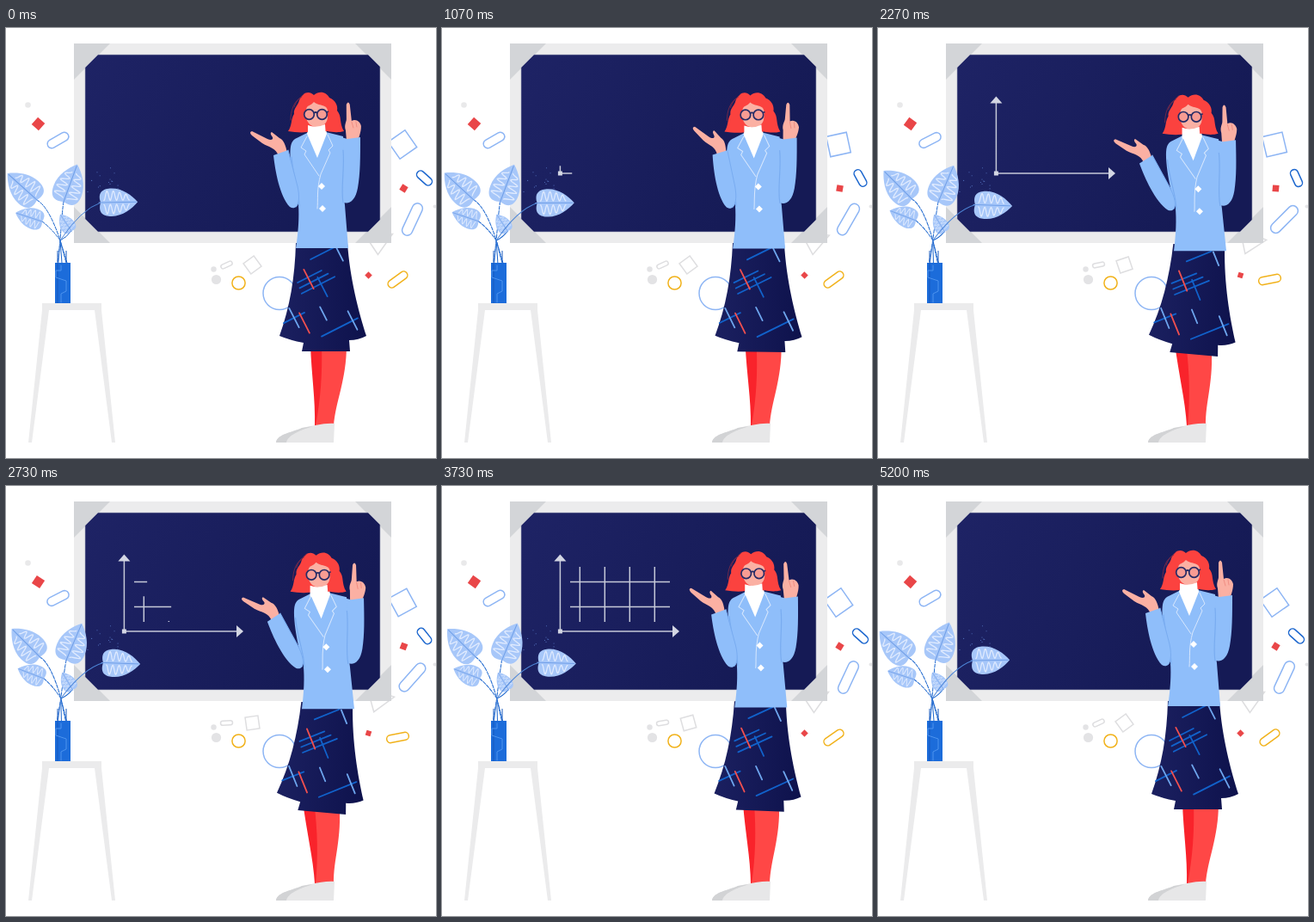
An HTML page for the animation above (5260 ms loop, 500x500 px).

```html
<!DOCTYPE html>
<html lang="en">
<head>
<meta charset="utf-8">
<title>Teacher at the board</title>
<style>
html, body { margin: 0; width: 100%; height: 100%; overflow: hidden; background: #fff; }
svg { display: block; width: 100%; height: 100%; }
.line { fill: none; stroke-linecap: round; }
.chalk { fill: none; stroke: #c6c9d8; stroke-width: 1.5; }
</style>
</head>
<body>
<svg viewBox="0 0 500 500">
  <defs>
    <linearGradient id="slate" x2="1" y2=".3">
      <stop stop-color="#1e2365"/><stop offset="1" stop-color="#151a55"/>
    </linearGradient>
    <linearGradient id="cloth">
      <stop stop-color="#1b2060"/><stop offset="1" stop-color="#0e124c"/>
    </linearGradient>
  </defs>

  <g id="props" class="line" stroke-width="1.5" transform="translate(.5 .5)"></g>

  <path d="M79 18H448V250H79Z" fill="#ececed"/>
  <path d="M79 18H121L79 60ZM448 18H406L448 60ZM79 250H121L79 208ZM448 250H406L448 208Z" fill="#d3d5d8"/>
  <path d="M107 31H421L435 45V223L421 237H107L92 222V46Z" fill="url(#slate)" stroke="#a9acc0" stroke-width=".6"/>
  <g id="chart"></g>

  <path d="M42 320H111V328H103L123 482H127L111 328H42L26 482H30L50 328H42Z" fill="#ebebec"/>

  <g id="specks" fill="#5877c4"></g>
  <g id="plant"></g>
  <path d="M57 273H75V320H57Z" fill="#1c6cda"/>
  <path d="M60 259V320M70 259V273" stroke="#1659bd" fill="none"/>
  <path class="line" d="M64 276V282H58V290L70 294V306L64 309V319" stroke="#4d93ee"/>

  <g id="legs">
    <path d="M354 368H372L366 463H359C360 432 355 402 354 368Z" fill="#f9232b"/>
    <path d="M367 368H396C396 410 383 434 381 463H360C366 430 368 402 367 368Z" fill="#ff4746"/>
  </g>
  <path d="M314 482C315 472 334 470 344 465C356 463 370 459 382 460L381 482Z" fill="#e7e7e8"/>
  <path d="M314 482C315 472 334 470 344 465L357 463C342 468 328 473 326 482Z" fill="#d2d3d5"/>

  <g id="skirt">
    <path d="M337 250H397C400 292 410 330 419 358Q410 363 399 363L400 376H344L346 366Q330 363 318 358C330 325 336 290 337 250Z" fill="url(#cloth)"/>
    <g id="plaid" class="line" stroke-width="1.8"></g>
  </g>

  <g id="torso">
    <g id="rightHand">
      <path d="M396 131L395 119C393 113 396 109 396 106L396 89Q398 84 400 89L402 108C407 105 412 109 413 114C413 122 410 126 410 131Z" fill="#fbb0a3"/>
      <path class="line" d="M402 109L404 116M407 109L408 115" stroke="#ef8b80" stroke-width=".9"/>
    </g>
    <path d="M386 126L397 129L412 127C412 150 412 170 409 186C406 202 398 206 390 202Z" fill="#8fbefa"/>
    <path d="M338 128L352 121H372L392 126C394 160 391 180 394 206L398 256H337C340 236 341 220 340 205C333 180 329 150 331 138C332 132 335 129 338 128Z" fill="#8fbefa"/>
    <path class="line" d="M392 142C394 165 389 185 392 203M332 150C334 175 341 190 341 207" stroke="#79acf0" stroke-width="1.2"/>
    <path d="M353 110H371L373 123L362 151L350 123Z" fill="#fff"/>
    <path class="line" d="M350 126L343 139L349 143L347 147L364 172M374 124L380 137L375 142L377 145L366 170C361 188 363 200 362 210" stroke="#d7e7fd" stroke-width="1"/>
    <path d="M367 180L371 184L367 188L363 184ZM368 206L372 210L368 214L364 210Z" fill="#fff"/>
    <g id="arm">
      <g id="leftHand">
        <path d="M317 149L327 145C325 136 323 130 318 128L309 121Q306 122 310 127C311 130 308 131 304 129L286 120Q282 121 286 125L298 134C306 139 314 139 317 149Z" fill="#fbb0a3"/>
      </g>
      <path d="M311 148L328 142L339 184C344 203 338 213 330 208C318 195 313 166 311 148Z" fill="#8fbefa"/>
      <path class="line" d="M328 142L339 184C342 198 340 205 337 208" stroke="#79acf0"/>
    </g>
  </g>

  <g id="head">
    <path d="M328 120C333 113 331 106 335 100C334 93 340 90 341 84C345 75 352 72 358 78C365 72 373 75 376 81C383 84 386 90 385 96C391 103 387 110 393 120C386 122 379 121 374 120L350 121C343 122 335 121 328 120Z" fill="#fb423f"/>
    <path d="M349 95C350 89 354 91 358 86C363 91 373 88 374 96L374 104C373 114 364 116 360 115C354 114 350 110 349 104Z" fill="#fbb0a3"/>
    <path class="line" d="M331 107C331 97 334 85 344 80M335 92C338 83 343 81 347 76" stroke="#852c48" stroke-width=".8"/>
    <path d="M351 113Q361 117 371 112L372 126H351Z" fill="#fff"/>
    <g stroke="#252b66" stroke-width="1.7" fill="#f89c93">
      <circle cx="352.5" cy="100.5" r="5.8"/>
      <circle cx="367.5" cy="100.5" r="5.8"/>
      <path d="M358 99Q360 97 362 99M373 98L375 97" fill="none"/>
    </g>
  </g>
</svg>
<script>
const LOOP = 5260;
const BLUE = "#8db5f4", DEEP = "#1d67ce", GOLD = "#f1b21b", RED = "#e94648", PALE = "#dedee0";
const $ = id => document.getElementById(id);

const smooth = (t, start, length) => {
  const u = Math.min(1, Math.max(0, (t - start) / length));
  return u * u * (3 - 2 * u);
};
// 0 to 1, a short rest, and back to 0
const hump = (t, start, end) => {
  const ramp = (end - start) * 0.4;
  return smooth(t, start, ramp) - smooth(t, end - ramp, ramp);
};

const add = (parent, tag, attrs) => {
  const el = document.createElementNS("http://www.w3.org/2000/svg", tag);
  for (const k in attrs) el.setAttribute(k, attrs[k]);
  return parent.appendChild(el);
};
const move = (el, value) => el.setAttribute("transform", value);

// Floating shapes: each turns away from its rest angle and back
const props = $("props");
const TURN_TIME = 2900;
const spinners = [];
const spin = (x, y, angle, turn, start, tag, attrs) =>
  spinners.push({ x, y, angle, turn, start, el: add(props, tag, attrs) });
const rect = (w, h, rx, look) => ({ x: -w / 2, y: -h / 2, width: w, height: h, rx, ...look });
const clip = (x, y, w, h, stroke, angle, turn, start) =>
  spin(x, y, angle, turn, start, "rect", rect(w, h, h / 2, { stroke }));
const square = (x, y, size, look, angle, turn, start) =>
  spin(x, y, angle, turn, start, "rect", rect(size, size, 0, look));
const dot = (cx, cy, r, look) => add(props, "circle", { cx, cy, r, ...look });

dot(25, 89, 3.3, { fill: "#e9e9ea" });
dot(241, 280, 3.2, { fill: "#e3e3e5" });
dot(244, 292, 5.6, { fill: "#e3e3e5" });
dot(498, 207, 2, { fill: "#e6e6e8" });
dot(270, 296, 7.6, { stroke: GOLD });
dot(317.5, 308, 19, { stroke: BLUE });

clip(60, 130, 27, 10, BLUE, -30, 3, 1000);
clip(486, 174, 21, 9, DEEP, 42, 26, 300);
clip(472, 222, 40, 12, BLUE, -65, 20, 700);
clip(455, 292, 26, 9, GOLD, -36, 25, 1000);
clip(256, 275, 14, 5, PALE, -25, 22, 1600);
square(460.5, 135, 24, { stroke: BLUE }, -35, 27, 200);
square(286, 275, 15, { stroke: PALE }, -36, 28, 1600);
square(37, 111, 11, { fill: RED }, 42, -9, 1600);
square(462, 186, 7.5, { fill: RED }, 32, -30, 300);
square(421, 287, 6, { fill: RED }, 45, -27, 900);
spin(432, 248, 0, 22, 700, "path", { d: "M0 15L-16 -9H17Z", stroke: PALE });

// Plaid strokes, along or across the weave
const plaid = (x, y, length, stroke, angle) => add($("plaid"), "path",
  { d: `M${-length / 2} 0h${length}`, stroke, transform: `translate(${x} ${y}) rotate(${angle})` });
const along = (x, y, length) => plaid(x, y, length, "#1162cb", -27);
const across = (x, y, length, color) => plaid(x, y, length, color, 63);

along(368, 262, 31);
for (let i = 0; i < 3; i++) along(353 + i * 5, 289 + i * 5, 31 + i * 6);
along(335, 337, 27);
along(388, 348, 47);
across(368, 301, 25, "#1162cb");
across(388, 263, 17, "#6ea6ee");
across(369, 332, 17, "#6ea6ee");
across(335, 337, 25, "#6ea6ee");
across(403, 340, 24, "#6ea6ee");
across(352, 292, 25, "#f2504f");
across(347, 343, 26, "#f2504f");

// Chalk drawing
const chart = $("chart");
const strokes = [];
const chalk = (x, y, dx, dy, start, length) =>
  strokes.push({ x, y, dx, dy, start, length, el: add(chart, "path", { class: "chalk" }) });

chalk(137.4, 169, 0, -83, 850, 1100);
chalk(137.4, 169, 132, 0, 850, 1100);
for (let i = 0; i < 2; i++) chalk(149, 140.5 - i * 29, 116, 0, 2400 + i * 150, 800);
for (let i = 0; i < 4; i++) chalk(160.3 + i * 29, 158, 0, -64, 2350 + 320 * Math.sqrt(i), 800);

const origin = add(chart, "rect", { x: -2.5, y: -2.5, width: 5, height: 5, fill: "#d3d6e3" });
const arrow = (x, y, angle) =>
  ({ x, y, angle, el: add(chart, "path", { d: "M0 -7L8 0L0 7Z", fill: "#d3d6e3" }) });
const arrows = [arrow(137.4, 87.5, -90), arrow(268, 169, 0)];

// Plant
const wave = side => {
  let d = "";
  for (let i = 0; i <= 60; i++) {
    const x = 4 + i / 2;
    const reach = 5.5 - Math.max(0, x - 18) * 0.17;
    const y = side * (2.5 + reach - reach * Math.cos(i / 60 * Math.PI * 8));
    d += (i ? "L" : "M") + x + " " + y.toFixed(1);
  }
  return d;
};
const leafShape = "M0 0C-4 -13 4 -16.5 13 -16.5C26 -16.5 37 -8 44 0C37 8 26 16.5 13 16.5C4 16.5 -4 13 0 0Z";

const sprig = (x, y, angle, scale, foot, color, dash) => {
  const el = add($("plant"), "g", {});
  add(el, "path", {
    d: `M${x} ${y}Q${(x + 64) / 2} ${y + 8} 63 247L${foot} 273`,
    class: "line", stroke: color, "stroke-dasharray": dash
  });
  const leaf = add(el, "g", { transform: `translate(${x} ${y}) rotate(${angle}) scale(${scale})` });
  add(leaf, "path", { d: leafShape, fill: "#a7c7f9" });
  for (const side of [-1, 1])
    add(leaf, "path", { d: wave(side), class: "line", stroke: "#dfeafe", "stroke-width": 1.3 });
  add(leaf, "path", { d: "M-2 0H42", class: "line", stroke: "#709fe8" });
  return el;
};
const sprigs = [
  sprig(36, 200, -138, 1.05, 70, DEEP, "4 1.5"),
  sprig(67, 202, -70, 1.05, 60, DEEP, "4 1.5"),
  sprig(42, 225, -162, 0.74, 71, DEEP, "4 1.5"),
  sprig(76, 236, -124, 0.53, 65, DEEP, "none"),
  sprig(110, 203, -1, 0.98, 61, "#4d86d8", "none")
];

// Pollen specks
let seed = 7;
const rand = () => (seed = seed * 16807 % 2147483647) / 2147483647;
for (let i = 0; i < 16; i++)
  add($("specks"), "circle", { cx: 95 + rand() * 38, cy: 161 + rand() * 32, r: 0.55 });

// Slides the row y1 by d1 and the row y2 by d2
const shear = (y1, d1, y2, d2, dy) => {
  const k = (d2 - d1) / (y2 - y1);
  return `matrix(1 0 ${k} 1 ${d1 - k * y1} ${dy})`;
};

function draw(t) {
  const lean = hump(t, 700, 4450);
  move($("torso"), shear(125, 4 * lean, 256, 7 * lean, 3.3 * lean));
  move($("skirt"), `rotate(${5 * lean} 330 323)`);
  move($("legs"), shear(376, -8 * lean, 462, 0, 0));
  move($("head"), `translate(${2.6 * lean} ${2.8 * lean})`);

  const reach = 3 * hump(t, 0, 2000) - 13 * hump(t, 1400, 3700);
  const wag = 3 * (0.8 + Math.cos((t - 1000) / LOOP * 6 * Math.PI));
  move($("arm"), `rotate(${reach} 333 203)`);
  move($("leftHand"), `rotate(${10 * hump(t, 0, 4600)} 321 144)`);
  move($("rightHand"), `rotate(${wag} 404 130)`);

  const sway = 3 * hump(t, 500, LOOP);
  for (const el of sprigs) move(el, `rotate(${sway} 64 262)`);
  for (const { el, x, y, angle, turn, start } of spinners)
    move(el, `translate(${x} ${y}) rotate(${angle + turn * hump(t, start, start + TURN_TIME)})`);

  chart.setAttribute("opacity", 1 - smooth(t, 4700, 300));
  for (const { el, x, y, dx, dy, start, length } of strokes) {
    const u = smooth(t, start, length);
    el.setAttribute("d", u ? `M${x} ${y}l${dx * u} ${dy * u}` : "");
  }
  move(origin, `translate(137.4 169) scale(${smooth(t, 700, 250)})`);
  for (const { el, x, y, angle } of arrows)
    move(el, `translate(${x} ${y}) rotate(${angle}) scale(${smooth(t, 1900, 300)})`);
}

const begin = performance.now();
function frame() {
  draw((performance.now() - begin) % LOOP);
  requestAnimationFrame(frame);
}
frame();
</script>
</body>
</html>
```
